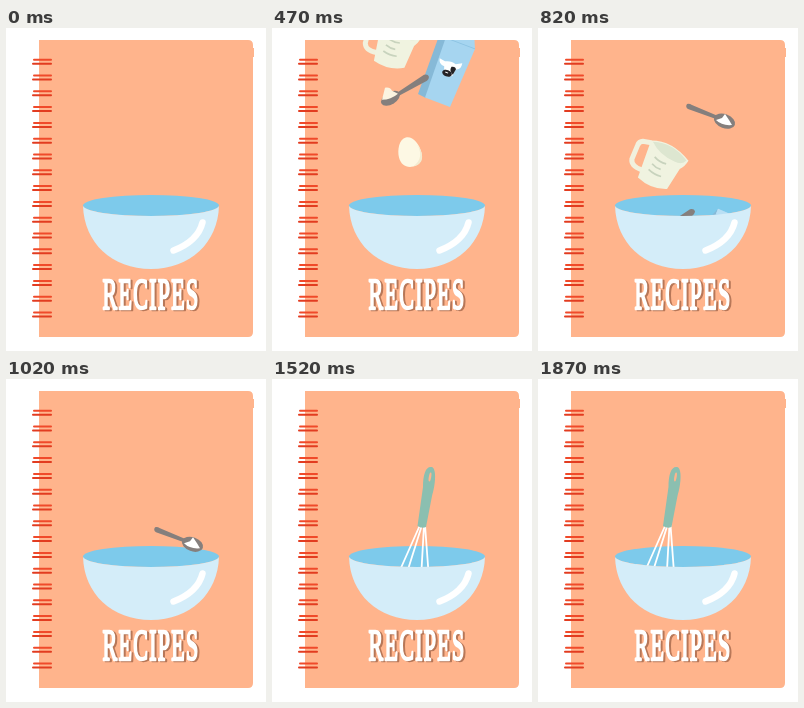
Animation of 260 by 323 pixels, one loop 1.92 s. Source, as an HTML page:

```html
<!DOCTYPE html>
<html lang="en">
<head>
<meta charset="utf-8">
<title>Recipes</title>
<style>
  html, body { margin: 0; width: 100%; height: 100%; overflow: hidden; background: #fff; }
  svg { display: block; width: 260px; height: 323px; }
  text { font: 44px "Liberation Serif", "Noto Serif", serif; letter-spacing: 2.6px; vector-effect: non-scaling-stroke; }
</style>
</head>
<body>
<svg viewBox="0 0 260 323">
  <defs>
    <clipPath id="above"><rect x="33" y="12" width="214" height="188"/></clipPath>
  </defs>
  <path d="M33 12H242Q247 12 247 17V20H248V29H247V304Q247 309 242 309H33Z" fill="#ffb48c"/>
  <g id="coils" fill="none" stroke-linecap="round"></g>
  <ellipse cx="145" cy="177.500" rx="68" ry="10.500" fill="#7dcaeb"/>

  <g clip-path="url(#above)">
    <g id="egg">
      <g transform="translate(137.500 124) rotate(-14)">
        <path d="M0-15C7-15 11.500-5 11.500 3C11.500 10 7 15 0 15S-11.500 10-11.500 3C-11.500-5-7-15 0-15Z" fill="#fdf8e4"/>
        <path d="M9-6Q14 9 0 15Q12 15 11.500 3Q11-2 9-6Z" fill="#f3ebd0"/>
      </g>
    </g>

    <g id="carton">
      <path d="M180 68L167 82L146 140L154 144L174 86Z" fill="#86b9d7"/>
      <path d="M180 68L202 77.500L203 95L178 153L153 143.500L174 83Z" fill="#a6d5f0"/>
      <path d="M180 68L202 77.500V82L178 73Z" fill="#b9dff4"/>
      <path d="M174 84L203 95" stroke="#8fc5e4" fill="none"/>
      <g transform="translate(177 111) rotate(20)">
        <path d="M-11-3L-5-2Q1-5 6-3L12-6Q13 1 8 2L7 9Q2 13-2 9L-4 3Q-10 3-11-3Z" fill="#fff"/>
        <path d="M3 1Q7-1 8 2L7 8Q2 6 3 1Z" fill="#252326"/>
        <ellipse cx="1" cy="8.500" rx="5" ry="3.300" fill="#252326"/>
        <path d="M-1 8H2" stroke="#fff"/>
      </g>
    </g>

    <g id="scoop">
      <path d="M152 102Q156 101 157 104Q157 106 155 108L127 123L125 120Z" fill="#857f7d"/>
      <ellipse cx="118.500" cy="125.500" rx="10.500" ry="6" fill="#857f7d" transform="rotate(-32 118.500 125.500)"/>
      <path d="M110 127L113 115Q118 114 120 118L126 121Q119 127 110 127Z" fill="#fbf4e1"/>
    </g>

    <g id="cup">
      <path d="M110 42L103 41.500Q99 42 98 46L93.500 60Q93 67 104 70" fill="none" stroke="#f1f1de" stroke-width="5" stroke-linecap="round"/>
      <path d="M111 40Q132 38 150 57Q147 63 142 66L131 87Q115 89 101 78Z" fill="#f0f3e0"/>
      <path d="M113 41Q133 40 148 57Q144 62 136 59Q120 53 113 41Z" fill="#dde6d0"/>
      <path d="M116 56Q121 61 128 62M114 63Q118 67 123 68M111 69Q117 74 124 75" fill="none" stroke="#c8d3bd" stroke-width="1.700"/>
    </g>

    <g id="spoon">
      <path d="M149 15Q147 18 150 20L178 30L180 27L154 16Q151 14 149 15Z" fill="#857f7d"/>
      <ellipse cx="186.500" cy="32" rx="11" ry="7" fill="#857f7d" transform="rotate(20 186.500 32)"/>
      <path d="M178 31L184 29L187 25L191 31L194 36Q184 37 178 31Z" fill="#fff"/>
    </g>

    <g id="whisk">
      <path d="M148 146L124 200M150 146L133 200M152 146L149 200M153 146L157 200" fill="none" stroke="#fff" stroke-width="1.800"/>
      <path d="M145.500 147L151 108C151 95 154 87 159.500 88C165 89 163.500 106 160 117L154 148Q150 150 145.500 147Z" fill="#8bbfb0"/>
      <ellipse cx="158" cy="98" rx="1.200" ry="4.500" fill="#ffb48c" transform="rotate(10 158 98)"/>
    </g>
  </g>

  <path d="M77 177.500A68 10.500 0 0 0 213 177.500C212 215 184 241 145 241S78 215 77 177.500Z" fill="#d4edf9"/>
  <path d="M196.500 194.500Q192 213 167.500 222.500" fill="none" stroke="#fff" stroke-width="6.500" stroke-linecap="round"/>
  <g id="title" stroke-width="2" stroke-linejoin="round"></g>
</svg>
<script>
  const LOOP = 1920, HOLD = 170, STEP = 50;
  const byId = id => document.getElementById(id);

  let coils = "";
  for (let i = 0; i < 17; i++) {
    const y = 33.5 + i * 15.8;
    coils += `<path d="M28 ${y - 1.8}H45" stroke="#f04a2a" stroke-width="2"/>
      <path d="M27 ${y + 2.2}H45" stroke="#e23c20" stroke-width="2"/>`;
  }
  byId("coils").innerHTML = coils;

  const lettering = (x, y, color) =>
    `<text transform="translate(${x} ${y}) scale(.5 1)" fill="${color}" stroke="${color}">RECIPES</text>`;
  byId("title").innerHTML = lettering(98.5, 282.3, "#b77758") + lettering(96.5, 280.5, "#fff");

  // Drawn pose at time "at"; speed, gravity and spin are per step.
  const drops = [
    { id: "egg", at: 470, speed: 23.3, gravity: 1 },
    { id: "carton", at: 620, speed: 26.2, gravity: 1 },
    { id: "scoop", at: 620, speed: 19, gravity: 0.4 },
    { id: "cup", at: 620, speed: 16.7, gravity: 0.8, spin: 1.2 },
    { id: "spoon", at: 620, speed: 13.9, gravity: 0.69 }
  ];

  const place = (id, x, y, visible, angle = 0) => {
    const part = byId(id);
    part.setAttribute("transform", `translate(${x.toFixed(2)} ${y.toFixed(2)}) rotate(${angle.toFixed(2)} 120 64)`);
    part.setAttribute("visibility", visible ? "visible" : "hidden");
  };

  function draw(ms) {
    const t = ms < HOLD ? 0 : HOLD + Math.floor((ms - HOLD) / STEP) * STEP;
    for (const { id, at, speed, gravity, spin = 0 } of drops) {
      const n = (t - at) / STEP;
      place(id, 0, speed * n + gravity * n * n / 2, t >= HOLD, spin * n);
    }
    const stirStart = 1320;
    const sway = t < stirStart ? 0 : -29 * Math.sin((t - stirStart) / 200 * Math.PI);
    const lift = Math.min(0, (t - stirStart) / STEP * 38);
    place("whisk", sway, lift, t > 1050);
  }

  const start = performance.now();
  function tick() {
    draw((performance.now() - start) % LOOP);
    requestAnimationFrame(tick);
  }
  tick();
</script>
</body>
</html>
```
